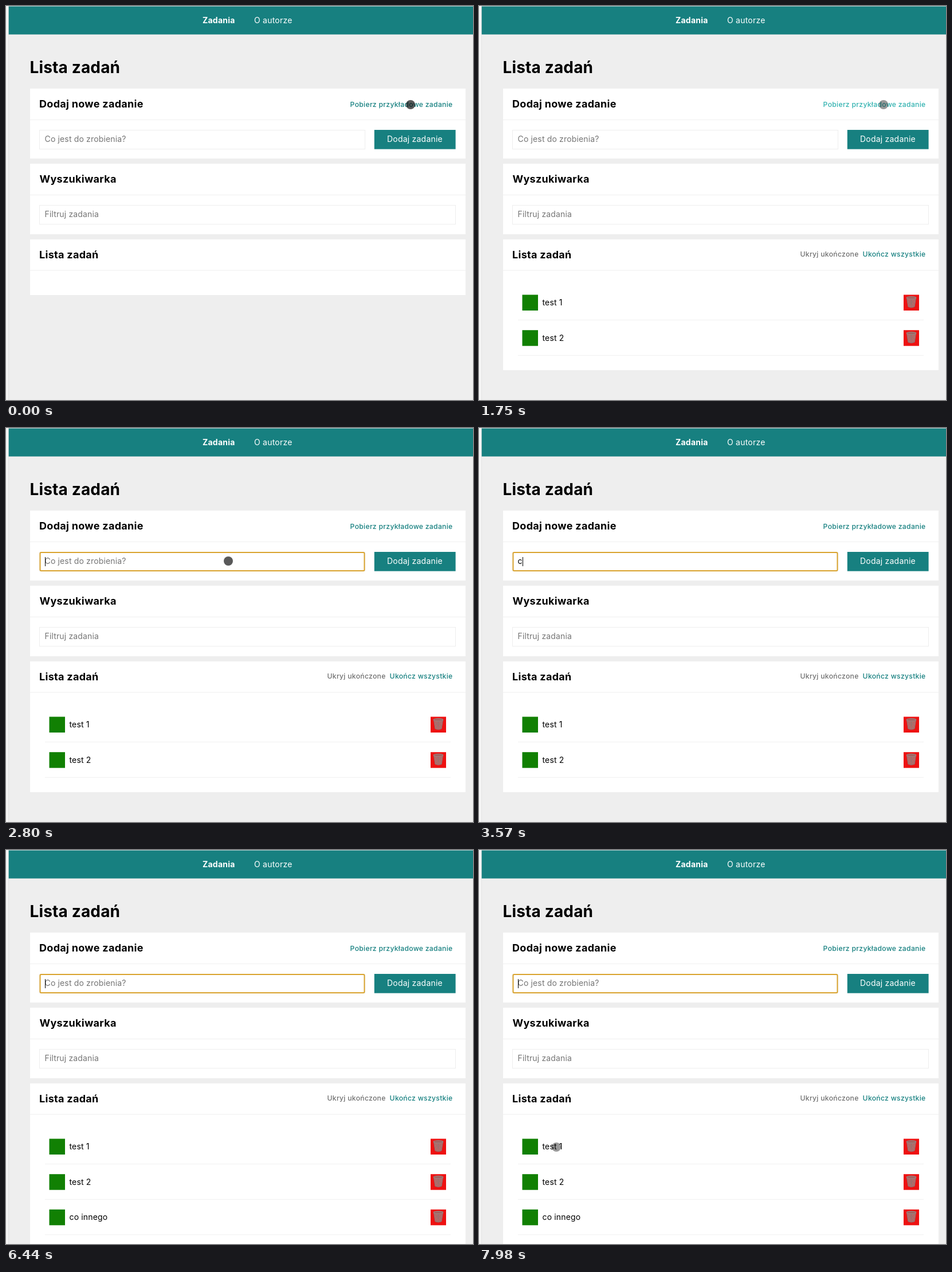
An HTML page for the animation above (8 s loop, 815 px wide and 687 px high).

```html
<!DOCTYPE html>
<html lang="pl">
<head>
<meta charset="utf-8">
<title>Lista zadań</title>
<style>
  html, body { margin: 0; width: 100%; height: 100%; overflow: hidden; background: #eee; }
  svg { display: block; width: 100%; height: 100%; }
  text { font: 400 14px Montserrat, Inter, sans-serif; letter-spacing: .15px; white-space: pre; }
  .title { font-size: 28px; font-weight: 650; letter-spacing: .15px; }
  .head { font-size: 18px; font-weight: 650; letter-spacing: .3px; }
  .link { font-size: 12.2px; font-weight: 450; letter-spacing: .28px; fill: #178080; }
  .grey { fill: #707070; }
  .hint { fill: #757575; }
  .nav { fill: #fff; letter-spacing: .22px; }
  .on { font-weight: 650; }
  .panel { fill: #fff; }
  .line { fill: #f0f0f0; }
  .box { fill: #fff; stroke: #eee; }
</style>
</head>
<body>
<svg viewBox="0 0 815 687">
  <defs>
    <g id="bin" stroke="#8d7473" stroke-width="1">
      <path d="M5.5 6 L8 21.5 Q13.5 24 19 21.5 L21.5 6 Z" fill="#b56a68"/>
      <path d="M8 9 L18 21 M11 8 L19 17 M19 9 L9 20 M16 8 L8 16 M13.5 8 V22" fill="none" stroke-width=".7"/>
      <ellipse cx="13.5" cy="5.7" rx="8.2" ry="2" fill="#a55d5b" stroke="#96827f" stroke-width="1.3"/>
    </g>
    <g id="row">
      <rect x="75.5" y="503.5" width="27.5" height="27.5" fill="#118003"/>
      <rect x="741" y="503.5" width="27" height="27.5" fill="#ee1111"/>
      <use href="#bin" x="741" y="503"/>
      <rect class="line" x="68" y="547" width="708" height="1"/>
    </g>
  </defs>

  <rect width="815" height="687" fill="#eee"/>
  <rect width="4" height="687" fill="#f5f5f5"/>
  <rect x="4" width="1" height="687" fill="#e4e4e4"/>
  <rect x="4.7" y=".7" width="811" height="48.9" fill="#178080"/>
  <text class="nav on" x="343" y="29.5">Zadania</text>
  <text class="nav" x="433" y="29.5">O autorze</text>
  <text class="title" x="41.5" y="117">Lista zadań</text>

  <rect class="panel" x="42" y="144" width="760" height="122"/>
  <rect class="line" x="42" y="198" width="760" height="1"/>
  <text class="head" x="58" y="177">Dodaj nowe zadanie</text>
  <text class="link" id="load" x="779.5" y="175.5" text-anchor="end"></text>
  <rect class="box" x="58.5" y="216.5" width="568" height="33"/>
  <rect id="ring" x="59.5" y="217" width="566" height="32" rx="2" fill="#fff" stroke="#d9a32e" stroke-width="2"/>
  <text id="entry" x="67.5" y="237.3"></text>
  <rect id="caret" y="225" width="1" height="16"/>
  <rect x="642.8" y="216" width="141.8" height="33.6" fill="#178080"/>
  <text class="nav" x="665" y="237.3">Dodaj zadanie</text>

  <rect class="panel" x="42" y="275" width="760" height="123"/>
  <rect class="line" x="42" y="329" width="760" height="1"/>
  <text class="head" x="58.5" y="308">Wyszukiwarka</text>
  <rect class="box" x="58.5" y="347.5" width="726" height="33"/>
  <text class="hint" x="67.5" y="368.3">Filtruj zadania</text>

  <rect class="panel" id="list" x="42" y="407" width="760"/>
  <rect class="line" x="42" y="460.5" width="760" height="1"/>
  <text class="head" x="58" y="439.7">Lista zadań</text>
  <g id="tasks">
    <text class="link grey" x="560.5" y="437.3">Ukryj ukończone</text>
    <text class="link" x="779.5" y="437.3" text-anchor="end">Ukończ wszystkie</text>
    <use href="#row"/>
    <text x="110.5" y="521.8">test 1</text>
    <use href="#row" y="61.7"/>
    <text x="110.5" y="583.5">test 2</text>
  </g>
  <g id="added">
    <use href="#row" y="123.3"/>
    <text x="110.5" y="645.1">co innego</text>
  </g>
  <circle id="cursor" r="8"/>
</svg>
<script>
const el = id => document.getElementById(id);
const show = (id, on) => el(id).setAttribute('visibility', on ? 'visible' : 'hidden');
const ramp = (t, a, b) => Math.min(1, Math.max(0, (t - a) / (b - a)));
const ease = p => p * p * (3 - 2 * p);

const LOOP = 8000, CLICK = 560, LOADED = 1540, FOCUS = 2800, ENTER = 6440;
const WORD = 'co innego';
const KEYS = [3500, 3780, 4060, 4340, 4620, 4830, 4970, 5250, 5460];

// time, x, y
const PATH = [
  [0, 706, 172], [2030, 706, 172], [2240, 396, 225], [2660, 388, 232],
  [6720, 388, 232], [7280, 372, 238], [7490, 145, 511], [7700, 135, 518], [LOOP, 135, 518]
];

function cursorAt(t) {
  const i = PATH.findIndex(p => p[0] > t);
  const [a, x, y] = PATH[i - 1], [b, X, Y] = PATH[i];
  const p = ease(ramp(t, a, b));
  return [x + (X - x) * p, y + (Y - y) * p];
}

function draw(t) {
  const loading = t >= CLICK && t < LOADED;
  const glow = ease(ramp(t, CLICK, 1060)) - ease(ramp(t, 2170, 2700));
  const mix = (a, b) => Math.round(a + (b - a) * glow);
  el('load').textContent = loading ? 'Ładowanie zadań...' : 'Pobierz przykładowe zadanie';
  el('load').style.fill = `rgb(${mix(23, 50)},${mix(128, 178)},${mix(128, 176)})`;

  const typed = t < ENTER ? WORD.slice(0, KEYS.filter(k => k <= t).length) : '';
  const entry = el('entry');
  entry.textContent = typed || 'Co jest do zrobienia?';
  entry.setAttribute('class', typed ? '' : 'hint');
  const focused = t >= FOCUS;
  show('ring', focused);
  show('caret', focused);
  el('caret').setAttribute('x', 68 + (typed ? Math.round(entry.getComputedTextLength()) : 0));

  const rows = t >= ENTER ? 3 : t >= LOADED ? 2 : 0;
  show('tasks', rows > 0);
  show('added', rows > 2);
  el('list').setAttribute('height', rows ? 104.5 + rows * 61.7 : 97);

  const [x, y] = cursorAt(t);
  const pressed = t < CLICK || (t >= 2730 && t < 2870);
  const cursor = el('cursor');
  cursor.setAttribute('cx', x);
  cursor.setAttribute('cy', y);
  cursor.setAttribute('fill-opacity', pressed ? .65 : .4);
  show('cursor', t < KEYS[0] || t >= 6720);
}

const start = performance.now();
function tick() {
  draw((performance.now() - start) % LOOP);
  requestAnimationFrame(tick);
}
tick();
</script>
</body>
</html>
```
